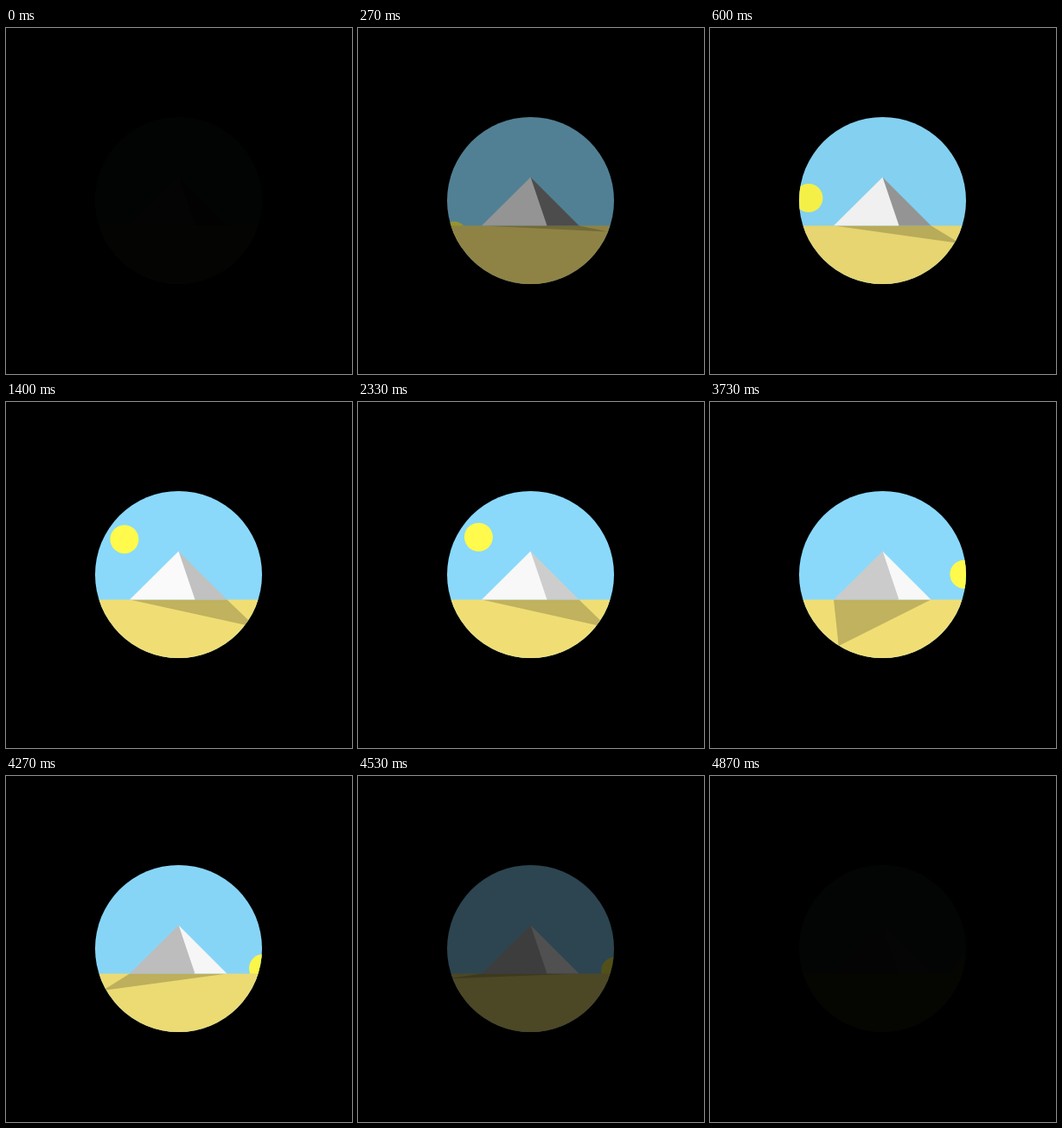
Recreate the animation shown at these times as an HTML page with a canvas. Size 400 by 400 pixels, loop 4940 ms.

```html
<!DOCTYPE html>
<html lang="en">
<head>
<meta charset="utf-8">
<title>Pyramid day</title>
<style>
html, body { margin: 0; width: 100%; height: 100%; overflow: hidden; background: #000; }
canvas { display: block; }
</style>
</head>
<body>
<canvas id="stage" width="400" height="400"></canvas>
<script>
const LOOP = 4940;
const canvas = document.getElementById('stage');
const ctx = canvas.getContext('2d');

// CSS-style cubic bezier easing, solved by bisection
function bezier(x1, y1, x2, y2) {
  const at = (a, b, s) => 3 * (1 - s) * (1 - s) * s * a + 3 * (1 - s) * s * s * b + s * s * s;
  return x => {
    let lo = 0, hi = 1;
    for (let i = 0; i < 24; i++) {
      const mid = (lo + hi) / 2;
      if (at(x1, x2, mid) < x) lo = mid; else hi = mid;
    }
    return at(y1, y2, (lo + hi) / 2);
  };
}
const ease = bezier(.25, .1, .25, 1);
const easeInOut = bezier(.42, 0, .58, 1);
const linear = x => x;

// Keys are [time, value, easing towards this key]
function track(t, keys) {
  if (t <= keys[0][0]) return keys[0][1];
  for (let i = 1; i < keys.length; i++) {
    const [t0, a] = keys[i - 1], [t1, b, curve = ease] = keys[i];
    if (t < t1) return a + (b - a) * curve((t - t0) / (t1 - t0));
  }
  return keys[keys.length - 1][1];
}

const HORIZON = 228.5;
const light = [[0, .015], [800, 1], [4250, 1], [LOOP, .015]];
const sunAngle = [[0, -112.3], [1800, -43], [2440, -43], [4640, 90.6]];
const shadowX = [[2450, 289], [3600, 151], [3650, 151], [LOOP, 101]];
const shadowY = [[0, HORIZON], [1650, 261], [2450, 261], [3700, 282, easeInOut], [3880, 282], [LOOP, HORIZON]];
const leftGrey = [[2070, 250], [2470, 247, linear], [3200, 214], [4270, 192, linear]];
const rightGrey = [
  [0, 105], [600, 155, linear], [1400, 193, linear],
  [2330, 205, linear], [3200, 246], [4270, 250, linear]
];

function poly(color, ...pts) {
  ctx.fillStyle = color;
  ctx.beginPath();
  pts.forEach(p => ctx.lineTo(...p));
  ctx.fill();
}

function disc(color, x, y, r) {
  ctx.fillStyle = color;
  ctx.beginPath();
  ctx.arc(x, y, r, 0, 2 * Math.PI);
  ctx.fill();
}

function grey(t, keys) {
  const v = Math.round(track(t, keys));
  return `rgb(${v},${v},${v})`;
}

function draw(t) {
  ctx.clearRect(0, 0, 400, 400);
  ctx.save();
  ctx.beginPath();
  ctx.arc(199.5, 199.5, 96.5, 0, 2 * Math.PI);
  ctx.clip();

  ctx.fillStyle = 'rgb(138,217,250)';
  ctx.fillRect(100, 100, 200, 200);

  const angle = track(t, sunAngle) * Math.PI / 180;
  disc('rgb(255,250,75)', 203.5 + 94 * Math.sin(angle), 225 - 94 * Math.cos(angle), 16.5);

  ctx.fillStyle = 'rgb(240,222,117)';
  ctx.fillRect(100, HORIZON, 200, 80);

  const left = [143, HORIZON], right = [255.5, HORIZON], top = [199.5, 172.5];
  poly('rgba(0,0,0,.2)', left, right, [track(t, shadowX), track(t, shadowY)]);
  poly(grey(t, rightGrey), top, right, [217, HORIZON]);
  poly(grey(t, leftGrey), top, [218.5, HORIZON], left);
  ctx.restore();

  canvas.style.opacity = track(t, light);
}

const start = performance.now();
function tick() {
  draw((performance.now() - start) % LOOP);
  requestAnimationFrame(tick);
}
tick();
</script>
</body>
</html>
```
